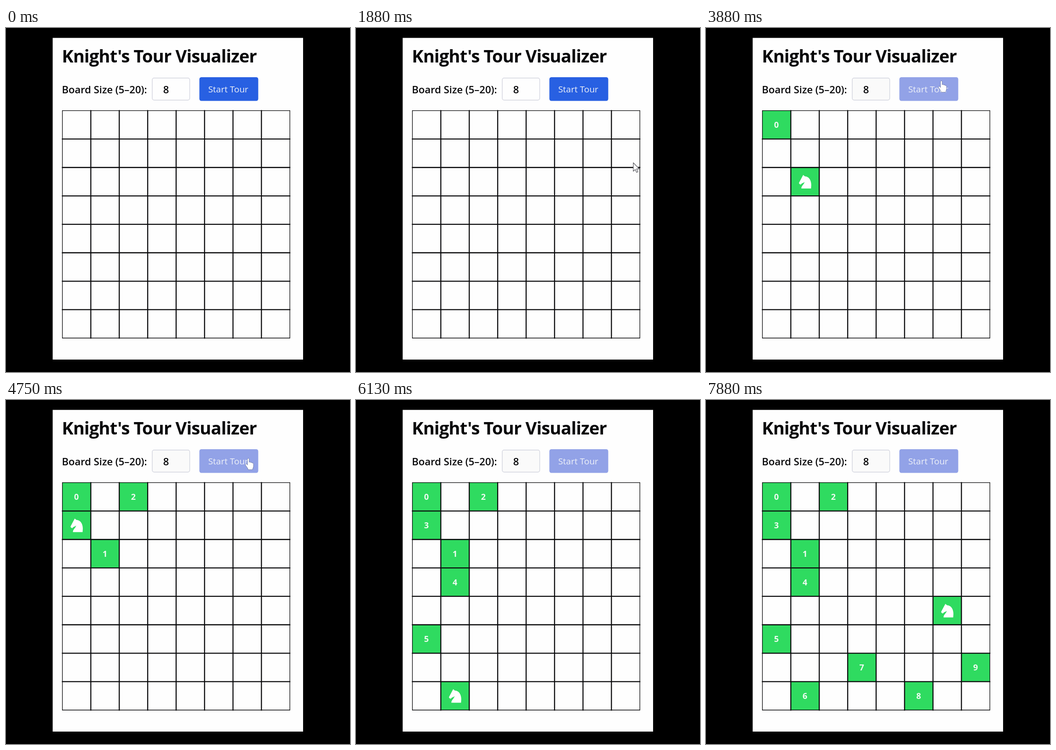
Write an HTML page that moves like this. It is 748 px wide and 748 px high and loops after 8000 ms.

```html
<!DOCTYPE html>
<html lang="en">
<head>
<meta charset="utf-8">
<title>Knight's Tour Visualizer</title>
<style>
  html, body { margin: 0; width: 100%; height: 100%; overflow: hidden; background: #000; }
  svg { display: block; width: 100vw; height: 100vh; }
  text { font-family: "Open Sans", "Noto Sans", sans-serif; fill: #060608; }
  .title { font-size: 38px; font-weight: 700; letter-spacing: -0.8px; }
  .label { font-size: 22px; font-weight: 600; }
  .button { font-size: 19px; fill: #eef1f8; }
  .count { font-size: 18px; font-weight: 700; fill: #effbf1; text-anchor: middle; }
</style>
</head>
<body>
<svg viewBox="0 0 748 748">
  <defs>
    <clipPath id="card"><rect x="101.5" y="21.5" width="544.5" height="699.5"/></clipPath>
  </defs>
  <rect width="748" height="748"/>
  <g clip-path="url(#card)">
    <rect x="101" y="21" width="546" height="701" fill="#fefefe"/>
    <text class="title" x="121.5" y="74.5">Knight's Tour Visualizer</text>
    <text class="label" x="121.5" y="142.3">Board Size (5–20):</text>
    <rect id="field" x="318" y="108.7" width="81.5" height="48" rx="4" stroke="#d3d5df" stroke-width="1.4"/>
    <text class="label" x="341.8" y="142.3">8</text>
    <rect id="button" x="420.5" y="107" width="128" height="51.5" rx="4.5"/>
    <text class="button" x="439.7" y="140.3">Start Tour</text>
    <g id="board"></g>
    <path id="knight" fill="#fff" d="M-4,-15 L-.5,-12 C9,-11.5 13.5,-3 13.5,7 L13,14.5 H-8
      C-8,8 -2,6 -1,0 C-3,2.5 -6,2.5 -7.5,4 L-9.5,6 L-11.5,5 C-13.5,4 -13.5,2 -12,0 L-7.5,-8.5 Z"/>
    <path id="arrow" fill="#fff" stroke="#55555c" stroke-width="1.2" stroke-linejoin="round"
      d="M0,0 V18.5 L4.2,14.6 L7,21 L10,19.7 L7.2,13.4 H13 Z"/>
    <path id="hand" fill="#fff" stroke="#34406e" stroke-opacity=".55" stroke-width=".9" stroke-linejoin="round"
      d="M-2,1.5 C-2,-.6 1.6,-.6 1.6,1.5 V8.5 C2.5,7.4 4.8,7.6 5,9.2 C6,8.2 8,8.6 8.2,10.2
      C9.2,9.5 11,10.2 11,11.8 V17 C11,20 9,21.5 9,24.5 H-.5 C-.5,21.5 -4,18.5 -6.2,14.5
      C-7.4,12.2 -4.8,11 -3.4,12.7 L-2,14.4 Z"/>
  </g>
</svg>
<script>
const LOOP = 8000, TICK = 125;
const LEFT = 122.6, TOP = 179.6, CELL = 61.83, SIZE = 8;
const START = 3352, STEP = 438;
const TOUR = [[0,0],[1,2],[2,0],[0,1],[1,3],[0,5],[1,7],[3,6],[5,7],[7,6],[6,4]];

// time, x, y of the pointer tip
const POINTER = [
  [950, 648, 342], [1000, 639, 338], [1750, 614, 318], [2000, 592, 268],
  [2250, 545, 180], [2500, 516, 122], [2625, 512, 115], [4650, 512, 115],
  [4875, 546, 142], [5000, 600, 178], [5125, 660, 220]
];

const find = id => document.getElementById(id);
const [field, button, board, knight, arrow, hand] =
  ["field", "button", "board", "knight", "arrow", "hand"].map(find);

function add(parent, tag, attrs) {
  const el = document.createElementNS("http://www.w3.org/2000/svg", tag);
  for (const key in attrs) el.setAttribute(key, attrs[key]);
  return parent.appendChild(el);
}

const center = ([col, row]) => [LEFT + (col + .5) * CELL, TOP + (row + .5) * CELL];
const show = (el, on) => { el.style.display = on ? "" : "none"; };
const place = (el, x, y) => el.setAttribute("transform", `translate(${x} ${y})`);

const visits = TOUR.map((cell, i) => {
  const [x, y] = center(cell);
  const fill = add(board, "rect", {
    x: x - CELL / 2, y: y - CELL / 2, width: CELL, height: CELL, fill: "#2fdb60"
  });
  const count = add(board, "text", { class: "count", x: x - .3, y: y + 6.6 });
  count.textContent = i;
  return { fill, count };
});

const span = CELL * SIZE;
for (let i = 0; i <= SIZE; i++) {
  const at = i * CELL, edge = i % SIZE === 0;
  add(board, "path", {
    d: `M${LEFT + at},${TOP} v${span} M${LEFT},${TOP + at} h${span}`,
    stroke: "#08080a", "stroke-width": edge ? 1.3 : 2.3, "stroke-linecap": "square"
  });
}

function pointerAt(t) {
  const i = POINTER.findIndex(p => p[0] > t);
  if (i < 1) return null;
  const [t0, x0, y0] = POINTER[i - 1], [t1, x1, y1] = POINTER[i];
  const k = (t - t0) / (t1 - t0);
  return [x0 + (x1 - x0) * k, y0 + (y1 - y0) * k];
}

function draw(time) {
  const t = Math.floor(time % LOOP / TICK) * TICK;
  const last = Math.min(Math.floor((t - START) / STEP), TOUR.length - 1);
  const running = last >= 0;

  visits.forEach(({ fill, count }, i) => {
    show(fill, i <= last);
    show(count, i < last);
  });
  show(knight, running);
  if (running) {
    const [x, y] = center(TOUR[last]);
    place(knight, x, y + .3);
  }

  const tip = pointerAt(t);
  const over = !!tip && tip[0] > 420 && tip[0] < 549 && tip[1] > 107 && tip[1] < 159;
  show(arrow, tip && !over);
  show(hand, over);
  if (tip) place(over ? hand : arrow, ...tip);

  button.setAttribute("fill", running ? "#92a2e7" : over ? "#2449d0" : "#2860e2");
  field.setAttribute("fill", running ? "#fafafa" : "#fefefe");
}

const begin = performance.now();
function frame() {
  draw(performance.now() - begin);
  requestAnimationFrame(frame);
}
frame();
</script>
</body>
</html>
```
